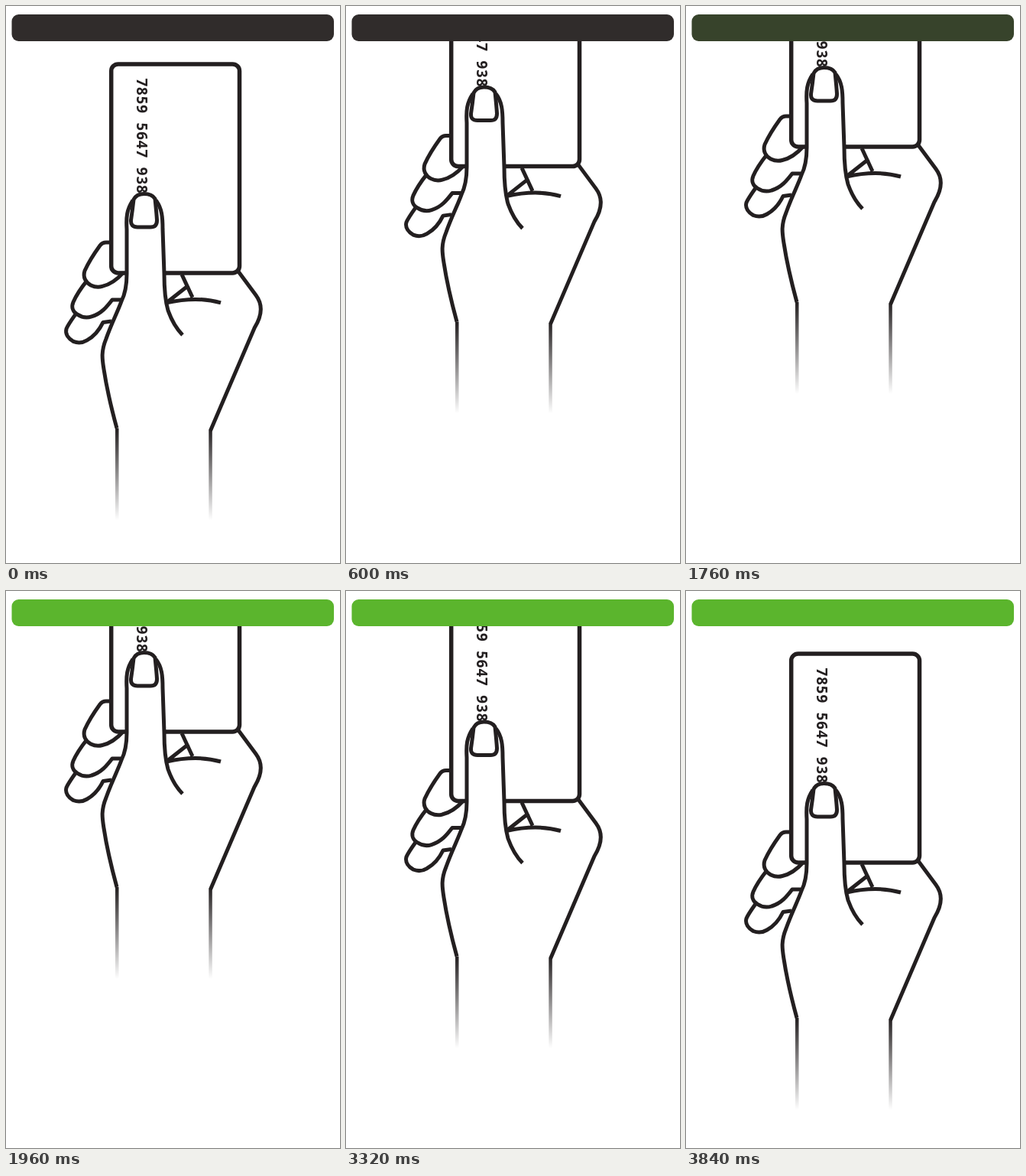
An HTML page for the animation above (5.8 s loop, 437 by 728 pixels).

```html
<!DOCTYPE html>
<html lang="en">
<head>
<meta charset="utf-8">
<title>Card reader</title>
<style>
  html, body { margin: 0; width: 100%; height: 100%; overflow: hidden; background: #fff; }
  svg { display: block; width: 100%; height: 100%; }
  .ink { fill: none; stroke: #231f20; stroke-width: 5; stroke-linejoin: round; }
  .paper { fill: #fff; }
  .digits { font: 600 19.4px "Noto Sans Mono", "DejaVu Sans Mono", monospace; fill: #231f20; white-space: pre; }
</style>
</head>
<body>
<svg viewBox="0 0 437 728">
  <defs>
    <clipPath id="slot"><rect y="30" width="437" height="698"/></clipPath>
    <linearGradient id="fade" gradientUnits="userSpaceOnUse" x1="0" y1="552" x2="0" y2="672">
      <stop offset="0" stop-color="#231f20"/>
      <stop offset="1" stop-color="#231f20" stop-opacity="0"/>
    </linearGradient>
  </defs>
  <g clip-path="url(#slot)">
    <g id="hand">
      <!-- fingers behind the card -->
      <g class="ink">
        <path d="M138 309H131Q126 309 123 313C115 324 108 335 103 346C100 355 105 362 111 365C116 367.500 121 368 126 366.500C137 364 145 358 153 349"/>
        <path d="M106 359C98 369 92 378 88 387C85 394 88 400 93 403C99 407 106 408 112 406C125 402 132 393 139 384H150"/>
        <path d="M91 403C86 410 81 417 79 422C77 429 82 435 88 438.500C94 441 101 440 106 437C115 432 122 424 127 413.500L138 412"/>
      </g>
      <rect class="ink paper" x="137.700" y="76" width="167.800" height="273" rx="9" style="stroke-width:5.500"/>
      <text class="digits" transform="translate(171 94) rotate(90)">7859 5647 938</text>
      <!-- palm and thumb -->
      <path class="paper" d="M166 254C158 266 157 276 158 292L158 350C158 364 156 376 151 386C146 400 138 415 131 435C124 452 126 462 128 475Q133 508 145 552H267L325 420L231 430C214 412 207 390 207 350L205 292C205 276 204 264 196 254Z"/>
      <g class="ink">
        <path d="M166 254C158 266 157 276 158 292L158 350C158 364 156 376 151 386C146 400 138 415 131 435C124 452 126 462 128 475Q133 508 145 552"/>
        <path d="M196 254C204 264 205 276 205 292L207 350C207 372 208 384 212 398C217 412 223 422 231 430"/>
        <path d="M210 388Q250 379 281 388M230 351L244 381M211 387L239 365"/>
        <path d="M304 347L327 378C336 390 335 405 325 421L267.500 555"/>
        <path class="paper" d="M167 253C170 247 175 245.500 180.500 245.500C186 245.500 192 247 195 252C196 262 197 271 197.500 280C197.500 287 194 289 189 289H172C166 289 163 286 163.500 280C165 270 166 262 167 253Z"/>
      </g>
      <path d="M143 552h4.500v120h-4.500zM265.300 554h4.500v118h-4.500z" fill="url(#fade)"/>
    </g>
  </g>
  <rect id="bar" x="7.500" y="11" width="421.500" height="35" rx="9"/>
</svg>
<script>
  const LOOP = 5800, STEP = 40;
  const OUT = 6, IN = -165;
  const DARK = [48, 44, 43], GREEN = [91, 181, 45];
  const hand = document.getElementById('hand');
  const bar = document.getElementById('bar');

  const clamp = v => Math.min(1, Math.max(0, v));
  const mix = (a, b, p) => a + (b - a) * p;

  function bezier(x1, y1, x2, y2) {
    const at = (a, b, s) => 3 * a * s * (1 - s) ** 2 + 3 * b * s * s * (1 - s) + s ** 3;
    return x => {
      let lo = 0, hi = 1;
      for (let i = 0; i < 24; i++) {
        const mid = (lo + hi) / 2;
        if (at(x1, x2, mid) < x) lo = mid; else hi = mid;
      }
      return at(y1, y2, (lo + hi) / 2);
    };
  }

  const easeIn = bezier(.3, .06, .455, 1);
  const easeOut = bezier(.33, .08, .56, 1);

  // The insertion is already under way when the loop begins.
  function offset(t) {
    return t < 2880
      ? mix(OUT, IN, easeIn(clamp((t + 80) / 1040)))
      : mix(IN, OUT, easeOut(clamp((t - 2880) / 960)));
  }

  function draw(now) {
    const t = Math.floor((now % LOOP) / STEP) * STEP;
    hand.setAttribute('transform', `translate(0 ${offset(t).toFixed(2)})`);
    const p = clamp((t - 1720) / 240);
    bar.setAttribute('fill', `rgb(${DARK.map((c, i) => Math.round(mix(c, GREEN[i], p)))})`);
  }

  const start = performance.now();
  function tick() {
    draw(performance.now() - start);
    requestAnimationFrame(tick);
  }
  tick();
</script>
</body>
</html>
```
